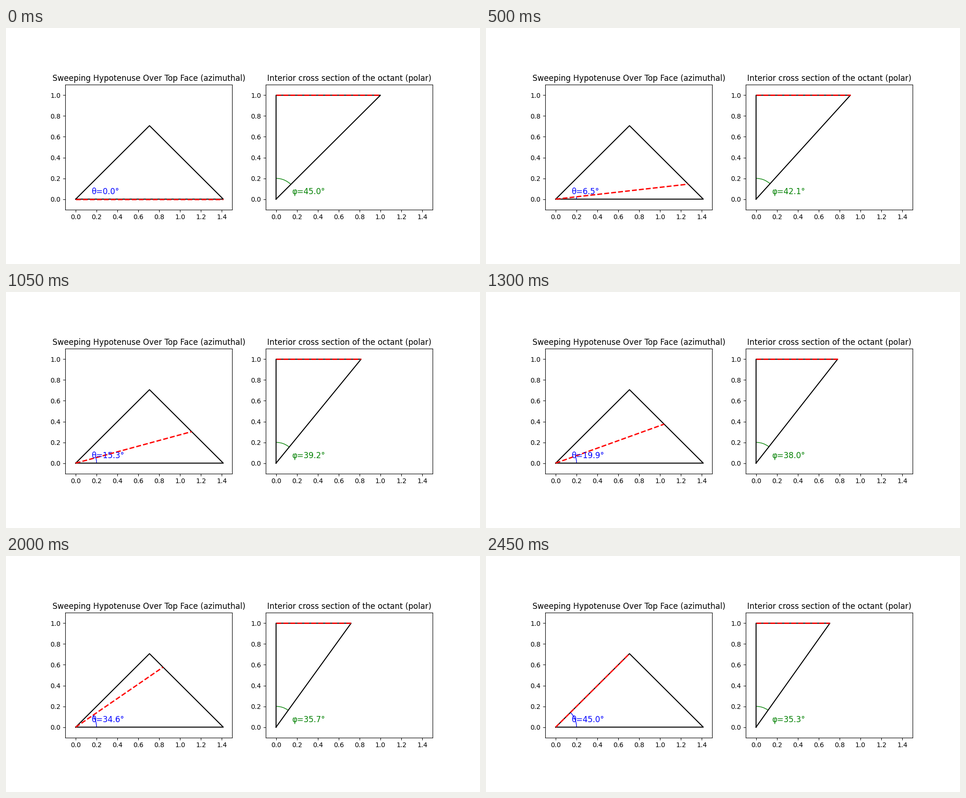
Animation of 1000x500 px, one loop 2500 ms. Source, as a matplotlib script:

```python
import numpy as np
import matplotlib.pyplot as plt
from matplotlib.animation import FuncAnimation
from matplotlib.patches import Arc

FRAMES = 50
INTERVAL = 50
ROOT2 = np.sqrt(2)
RADIUS = 0.2

plt.rcParams["font.family"] = "DejaVu Sans"
fig, (top_ax, side_ax) = plt.subplots(1, 2, figsize=(10, 5), dpi=100)


def setup_axes(ax, title):
    ax.set_xlim(-0.1, 1.5)
    ax.set_ylim(-0.1, 1.1)
    ax.set_aspect("equal")
    ax.set_xticks(np.arange(0, 1.5, 0.2))
    ax.set_yticks(np.arange(0, 1.1, 0.2))
    ax.set_title(title)


def add_angle(ax, color, start, end):
    arc = Arc((0, 0), 2 * RADIUS, 2 * RADIUS, theta1=start, theta2=end, color=color)
    ax.add_patch(arc)
    return arc, ax.text(0.15, 0.05, "", color=color, fontsize=12)


setup_axes(top_ax, "Sweeping Hypotenuse Over Top Face (azimuthal)")
setup_axes(side_ax, "Interior cross section of the octant (polar)")

top_ax.plot([0, ROOT2, ROOT2 / 2, 0], [0, 0, ROOT2 / 2, 0], "k-", lw=1.5)
sweep, = top_ax.plot([], [], "r--", lw=2)
section, = side_ax.plot([], [], "k-", lw=1.5)
section_top, = side_ax.plot([], [], "r--", lw=2)
theta_arc, theta_text = add_angle(top_ax, "blue", 0, 0)
phi_arc, phi_text = add_angle(side_ax, "green", 45, 90)


def update(frame):
    # The sweep's tip slides evenly from the right corner to the apex.
    y = ROOT2 / 2 * frame / (FRAMES - 1)
    x = ROOT2 - y
    width = np.hypot(x, y) / ROOT2
    theta = np.degrees(np.arctan2(y, x))
    phi = np.degrees(np.arctan(width))

    sweep.set_data([0, x], [0, y])
    section.set_data([0, 0, width, 0], [0, 1, 1, 0])
    section_top.set_data([0, width], [1, 1])

    theta_arc.theta2 = theta
    theta_arc.set_visible(frame > 0)
    phi_arc.theta1 = 90 - phi
    theta_text.set_text(f"θ={theta:.1f}°")
    phi_text.set_text(f"φ={phi:.1f}°")
    return sweep, section, section_top, theta_arc, phi_arc, theta_text, phi_text


anim = FuncAnimation(fig, update, frames=FRAMES, interval=INTERVAL, repeat=True)
plt.show()
```
